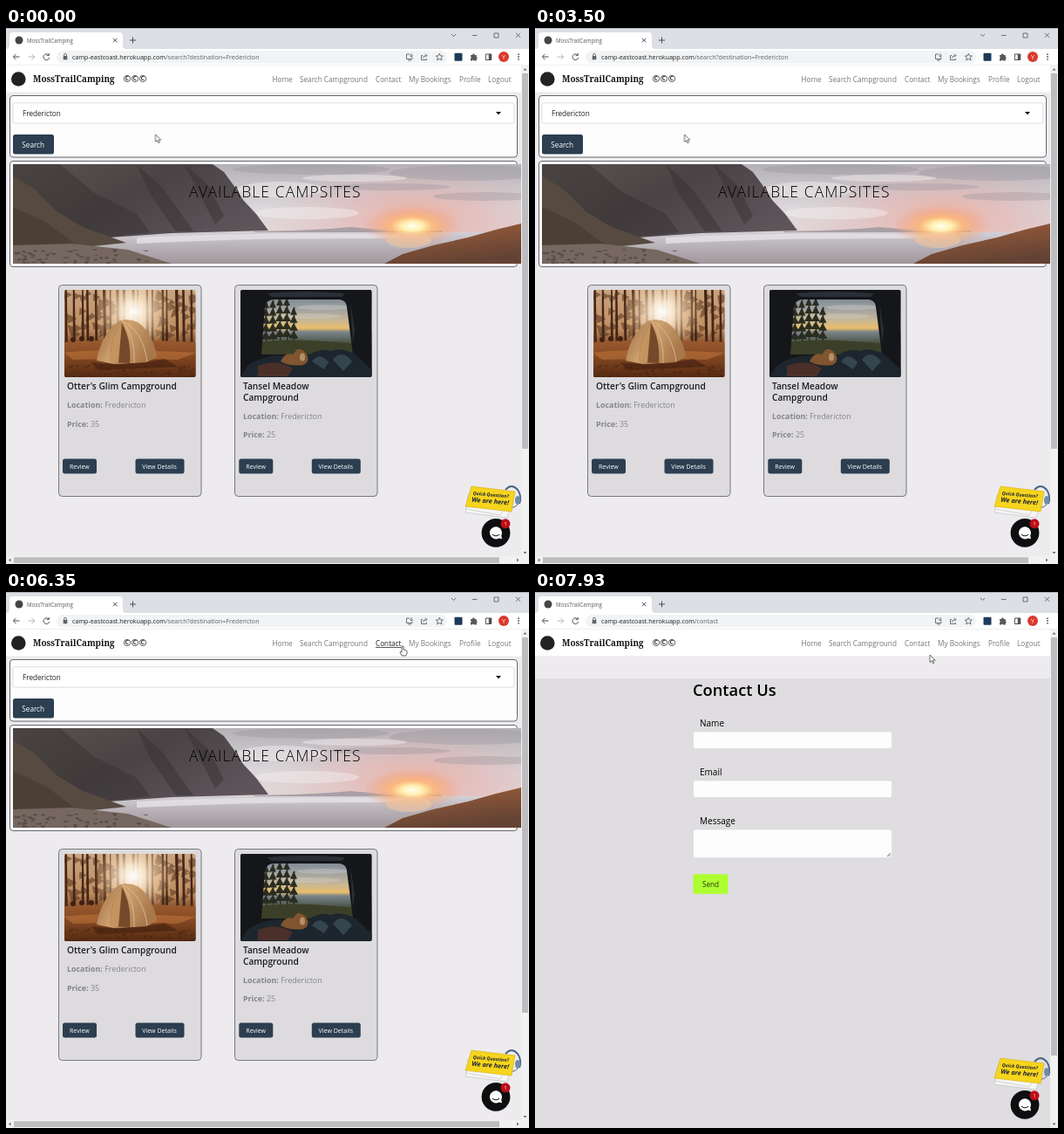
Recreate the animation shown at these times as an HTML page. Size 600 by 614 pixels, loop 8000 ms.

```html
<!DOCTYPE html>
<html lang="en">
<head>
<meta charset="utf-8">
<title>Campsite search</title>
<style>
html, body { margin: 0; width: 100%; height: 100%; overflow: hidden; background: #edebee; }
svg { display: block; width: 100vw; height: 100vh; }
text { font: 8.2px "Open Sans", "Noto Sans", sans-serif; white-space: pre; }
.line { fill: none; stroke: #4b4e53; stroke-width: 1; }
.thin { fill: none; stroke: #5f6368; stroke-width: .9; }
.tab-title { font-size: 6.2px; fill: #55585c; }
.url { font-size: 7.16px; fill: #5f6368; }
.host { fill: #202124; }
.brand { font: 700 9.9px "Noto Serif", serif; fill: #161616; }
.marks { font-size: 10.8px; font-weight: 600; fill: #222; }
.nav text { fill: #777; }
.box { fill: #fdfdfd; stroke: #66686c; stroke-width: 1; }
.button { fill: #2c3e50; }
.on-button { fill: #fff; }
.small { font-size: 7.05px; }
.hero { font-size: 17.5px; font-weight: 300; letter-spacing: 1.1px; }
.card { fill: #dddbde; stroke: #77787b; stroke-width: 1; }
.name { font-size: 10.2px; font-weight: 600; fill: #1c1c1e; }
.info { font-size: 8.9px; fill: #858487; }
.info tspan { font-weight: 700; }
.heading { font-size: 18.3px; font-weight: 600; }
.label { font-size: 10px; }
.track { fill: #f1f1f1; }
.thumb { fill: #bdbdbf; }
.arrow { fill: #6a6a6a; }
.sign { font-weight: 700; font-style: italic; fill: #1d2338; text-anchor: middle; }

/* One shared 8 s timeline with hard cuts */
.before, .after, .loading, .ready, .extension, .search, .contact,
.hover, .pointer, .hand, .widget, .face { animation: 8s step-end infinite; }
.before { animation-name: before; }
.after { animation-name: after; }
.loading { animation-name: loading; }
.ready { animation-name: ready; }
.extension { animation-name: extension; }
.search { animation-name: search; }
.contact { animation-name: contact; }
.hover { animation-name: hover; }
.pointer { animation-name: pointer; }
.hand { animation-name: hand; }
.widget { animation-name: widget; }
.face { animation-name: face; }
@keyframes before { 0% { opacity: 1 } 83%, to { opacity: 0 } }
@keyframes after { 0% { opacity: 0 } 83%, to { opacity: 1 } }
@keyframes loading { 0% { opacity: 0 } 83% { opacity: 1 } 88.375%, to { opacity: 0 } }
@keyframes ready { 0% { opacity: 1 } 83% { opacity: 0 } 88.375%, to { opacity: 1 } }
@keyframes extension { 0% { opacity: 1 } 83% { opacity: .12 } 93.75%, to { opacity: 1 } }
@keyframes search { 0% { opacity: 1 } 86.625%, to { opacity: 0 } }
@keyframes contact { 0% { opacity: 0 } 86.625%, to { opacity: 1 } }
@keyframes hover { 0% { opacity: 0 } 66.875% { opacity: 1 } 86.625%, to { opacity: 0 } }
@keyframes pointer {
  0% { transform: translate(171.5px, 122px); opacity: 1 }
  59.75% { transform: translate(215px, 108px) }
  61.625% { transform: translate(370px, 84px) }
  65.125% { transform: translate(441px, 68px); opacity: 1 }
  66.875% { transform: translate(453px, 72px); opacity: 0 }
  83%, to { transform: translate(453px, 72px); opacity: 1 }
}
@keyframes hand { 0% { opacity: 0 } 66.875% { opacity: 1 } 83%, to { opacity: 0 } }
@keyframes widget {
  0% { transform: none; opacity: 1 }
  86.625% { transform: translateY(9px); opacity: 0 }
  95.5% { transform: translateY(9px); opacity: .5 }
  97.25%, to { transform: translateY(9px); opacity: 1 }
}
@keyframes face { 0% { opacity: 1 } 86.625% { opacity: 0 } 99.125%, to { opacity: 1 } }
</style>
</head>
<body>
<svg viewBox="0 0 600 614" preserveAspectRatio="none">
<defs>
  <linearGradient id="sky" x2="0" y2="1">
    <stop offset="0" stop-color="#b3b0b6"/><stop offset=".25" stop-color="#cbc8cc"/><stop offset=".45" stop-color="#dcd8db"/><stop offset=".68" stop-color="#e3d5d4"/>
  </linearGradient>
  <radialGradient id="blush">
    <stop offset="0" stop-color="#f3a58c" stop-opacity=".75"/><stop offset=".5" stop-color="#e6adab" stop-opacity=".45"/><stop offset="1" stop-color="#d9b5b8" stop-opacity="0"/>
  </radialGradient>
  <radialGradient id="sun">
    <stop offset="0" stop-color="#fffef0"/><stop offset=".22" stop-color="#fff0b0"/>
    <stop offset=".45" stop-color="#fdb877" stop-opacity=".85"/><stop offset="1" stop-color="#f0987c" stop-opacity="0"/>
  </radialGradient>
  <linearGradient id="rock" x2="1" y2=".6">
    <stop offset="0" stop-color="#5c5350"/><stop offset=".5" stop-color="#4a4345"/><stop offset="1" stop-color="#5d555a"/>
  </linearGradient>
  <linearGradient id="sand" x2="0" y2="1">
    <stop offset="0" stop-color="#d3d0d6"/><stop offset=".35" stop-color="#bcb7bd"/><stop offset="1" stop-color="#a0979b"/>
  </linearGradient>
  <linearGradient id="hill" x2=".4" y2="1">
    <stop offset="0" stop-color="#a3603a"/><stop offset="1" stop-color="#644334"/>
  </linearGradient>
  <linearGradient id="forest" x2="0" y2="1">
    <stop offset="0" stop-color="#c9a37f"/><stop offset=".45" stop-color="#c08e62"/><stop offset=".6" stop-color="#8a5530"/><stop offset="1" stop-color="#4f2813"/>
  </linearGradient>
  <linearGradient id="floor" x2="0" y2="1">
    <stop offset="0" stop-color="#9a5a30"/><stop offset=".4" stop-color="#874a24"/><stop offset="1" stop-color="#552a12"/>
  </linearGradient>
  <radialGradient id="flare">
    <stop offset="0" stop-color="#fff"/><stop offset=".25" stop-color="#fff2dc" stop-opacity=".9"/><stop offset="1" stop-color="#ffd09a" stop-opacity="0"/>
  </radialGradient>
  <linearGradient id="tent" y2=".4">
    <stop offset="0" stop-color="#9a683c"/><stop offset=".5" stop-color="#cfa271"/><stop offset="1" stop-color="#a8774b"/>
  </linearGradient>
  <linearGradient id="dusk" x2="0" y2="1">
    <stop offset="0" stop-color="#68747f"/><stop offset=".2" stop-color="#9a9fa3"/><stop offset=".35" stop-color="#c9b795"/><stop offset=".44" stop-color="#e9bd6a"/><stop offset=".48" stop-color="#7c858a"/><stop offset=".56" stop-color="#5c6660"/><stop offset=".64" stop-color="#3d4230"/>
  </linearGradient>
  <linearGradient id="fade"><stop offset="0" stop-color="#fff" stop-opacity="0"/><stop offset="1" stop-color="#fff"/></linearGradient>
  <clipPath id="heroClip"><path d="M8 156H591V270H8Z"/></clipPath>
  <clipPath id="photoClip"><rect width="150.5" height="100" rx="2"/></clipPath>
  <clipPath id="titleClip"><path d="M20 5H117V24H20Z"/></clipPath>
</defs>

<!-- Browser chrome -->
<path fill="#dcdfe3" d="M0 0H600V24H0Z"/>
<path fill="#a5a8ac" d="M0 0H600V.8H0Z"/>
<path fill="#fff" d="M0 24Q4 24 4 20V9Q4 5 8 5H130Q134 5 134 9V20Q134 24 138 24H600V74H0Z"/>
<g class="ready"><circle cx="15" cy="14" r="4.5" fill="#444"/><text class="tab-title" x="24" y="16.5">MossTrailCamping</text></g>
<g class="loading">
  <path class="thin" stroke-width=".6" d="M12 14.5A3 3 0 0 1 14.5 11.5"/>
  <g clip-path="url(#titleClip)"><text class="tab-title" x="24" y="16.5">https://camp-eastcoast.herokuapp</text></g>
  <path fill="url(#fade)" d="M97 6H118V22H97Z"/>
</g>
<path class="line" d="M123 11.8l4.5 4.5m0-4.5l-4.5 4.5M142 14h7m-3.5-3.5v7"/>
<path class="thin" d="M511 7l2.5 2.5L516 7M535 8.5h5.5M560 6h5v5h-5zM585 5.8l5 5m0-5l-5 5"/>
<path class="line" d="M15.5 33h-7m3-3.2L8.3 33l3.2 3.2"/>
<path class="line" stroke-opacity=".4" d="M25.5 33h7m-3-3.2l3.2 3.2-3.2 3.2"/>
<path class="line ready" d="M48.8 30.8A3.4 3.4 0 1 0 49.7 34M49.3 29v2.4h-2.6"/>
<path class="line loading" d="M43.6 30.2l5.4 5.4m0-5.4l-5.4 5.4"/>
<rect x="58" y="26" width="448" height="14.5" rx="7.25" fill="#f1f3f4"/>
<path fill="#5f6368" d="M65.7 32H70.3V36.3H65.7Z"/><path class="thin" d="M66.6 32v-1.3a1.4 1.4 0 0 1 2.8 0V32"/>
<text class="url before" x="76" y="36"><tspan class="host">camp-eastcoast.herokuapp.com</tspan>/search?destination=Fredericton</text>
<text class="url after" x="76" y="36"><tspan class="host">camp-eastcoast.herokuapp.com</tspan>/contact</text>
<path class="thin" d="M463 30h-3.5v5.5h6.5V33.5M461 37h4M465 29v4m-1.7-1.6l1.7 1.7 1.7-1.7M478 31.5h-1.5v5h6v-1.5M478.5 34.5q0-3 4-3m-1.5-2l2 2-2 2"/>
<path class="thin" d="M497.3 29.2l1.2 2.7 2.9.2-2.2 1.9.8 2.9-2.7-1.6-2.6 1.6.7-2.9-2.2-1.9 2.9-.2z"/>
<rect class="extension" x="514.5" y="28.8" width="9" height="9" rx="1" fill="#1c3b58"/>
<path fill="#55595e" d="M533 31h2a1.4 1.4 0 0 1 2.8 0h2v2.2a1.4 1.4 0 0 1 0 2.6V37.5h-2.6a1.3 1.3 0 0 0-2.4 0H533V35a1.4 1.4 0 0 0 0-2.4z"/>
<path class="line" d="M550.3 30h6.5v6.5h-6.5z"/><path fill="#4b4e53" d="M553.8 30h3v6.5h-3z"/>
<circle cx="571" cy="33" r="6" fill="#d83a2c"/><text x="571" y="35.6" class="on-button" text-anchor="middle" style="font-size:7px">Y</text>
<g fill="#4b4e53"><circle cx="588" cy="30.2" r=".9"/><circle cx="588" cy="33" r=".9"/><circle cx="588" cy="35.8" r=".9"/></g>
<path fill="#dedfe2" d="M0 42.5H600V43H0Z"/>

<!-- Site header -->
<circle cx="14.3" cy="58.5" r="8.3" fill="#222"/>
<text class="brand" x="31" y="62">MossTrailCamping</text>
<text class="marks" x="134.5" y="62.3">©©©</text>
<g class="nav">
  <text x="305.5" y="62">Home</text><text x="337" y="62">Search Campground</text><text x="424" y="62">Contact</text>
  <text x="462" y="62">My Bookings</text><text x="520" y="62">Profile</text><text x="553" y="62">Logout</text>
</g>
<g class="hover"><path fill="#fff" d="M423 53H455V66H423Z"/><text x="424" y="62" fill="#222">Contact</text><path fill="#333" d="M424 63H453.5V63.8H424Z"/></g>
<path fill="#edebee" d="M0 73.5H591V614H0Z"/>

<!-- Search results -->
<g class="search">
  <rect class="box" x="4.5" y="77.5" width="582" height="70.5" rx="3.5"/>
  <rect x="8" y="85.8" width="575" height="23.4" rx="2.5" fill="#fff" stroke="#dcdde0"/>
  <text x="19" y="100.8" fill="#222">Fredericton</text>
  <path d="M562 96h6l-3 3.3z"/>
  <rect class="button" x="8" y="122" width="47" height="22.5" rx="2.5"/>
  <text class="on-button" x="18.3" y="136.6">Search</text>
  <rect class="box" x="4.5" y="152.5" width="582" height="121" rx="3.5"/>
  <g clip-path="url(#heroClip)">
    <path fill="url(#sky)" d="M8 156H591V270H8Z"/>
    <ellipse cx="470" cy="215" rx="170" ry="62" fill="url(#blush)"/>
    <g fill="#8d8992" opacity=".28"><ellipse cx="350" cy="162" rx="90" ry="6"/><ellipse cx="530" cy="166" rx="90" ry="9"/><ellipse cx="440" cy="182" rx="70" ry="4"/><ellipse cx="550" cy="193" rx="60" ry="5"/></g>
    <g fill="#f4f0f1" opacity=".45"><ellipse cx="315" cy="185" rx="50" ry="9"/><ellipse cx="400" cy="172" rx="60" ry="4"/><ellipse cx="345" cy="212" rx="60" ry="7"/></g>
    <path fill="#a99fa6" d="M285 233L330 232 372 230 395 228 440 232 500 232V235H285Z"/>
    <path fill="url(#sand)" d="M8 234H591V270H8Z"/>
    <path fill="#e6e3e7" opacity=".8" d="M150 240Q300 233 470 237L430 241Q280 240 150 247Z"/>
    <ellipse cx="466" cy="227" rx="55" ry="24" fill="url(#sun)"/>
    <ellipse cx="462" cy="243" rx="26" ry="9" fill="#f3c9a2" opacity=".55"/>
    <path fill="url(#rock)" d="M8 156H237L250 165 261 180 272 197 287 213 301 232 190 235 90 242 8 250Z"/>
    <path fill="#332f30" opacity=".45" d="M62 156L100 188 150 213 165 234 110 240 60 215 8 178V156ZM150 156L180 184 215 233H195L165 190ZM205 156L232 180 250 215 240 225 222 190Z"/>
    <path fill="#574b41" d="M8 170L32 184 58 210 88 228 138 246 70 253 8 256Z"/>
    <path fill="#45392f" opacity=".6" d="M8 205L45 222 80 248 8 252Z"/>
    <path fill="#766860" d="M8 249L75 247 140 254 190 270H8Z"/>
    <path fill="url(#hill)" d="M591 224L562 231 530 240 490 249 455 259 434 270H591Z"/>
    <g id="stones" fill="#443c3b" opacity=".6"></g>
  </g>
  <text class="hero" x="210" y="194">AVAILABLE CAMPSITES</text>

  <rect class="card" x="60.5" y="294.5" width="163.5" height="242" rx="4"/>
  <g transform="translate(67 300)"><g clip-path="url(#photoClip)">
    <path fill="url(#forest)" d="M0 0H151V100H0Z"/>
    <g id="canopy" fill="#5a3822" opacity=".6"></g>
    <g id="trunks" fill="#452717"></g>
    <circle cx="79" cy="25" r="46" fill="url(#flare)"/>
    <path fill="url(#floor)" d="M0 60Q60 55 151 60V100H0Z"/>
    <path fill="#c67a3c" opacity=".5" d="M0 72Q40 66 151 72L130 80Q70 78 10 80Z"/>
    <g fill="#3f2114"><ellipse cx="10" cy="57" rx="3" ry="3"/><ellipse cx="20" cy="56" rx="3" ry="3"/><ellipse cx="31" cy="56" rx="3" ry="3"/></g>
    <path fill="#3d1d0d" opacity=".55" d="M30 83Q70 88 115 79L130 88 40 92Z"/>
    <path fill="url(#tent)" d="M37 81Q43 48 64 35Q84 31 95 48Q104 61 106 77L94 83 57 85Z"/>
    <path fill="#75492a" d="M53 83Q51 57 66 38Q77 57 75 84Z"/>
    <path fill="#c4935f" d="M53 83Q51 57 66 38L62 83Z"/>
    <path fill="none" stroke="#e6c293" stroke-width=".8" d="M66 35Q90 47 95 82M66 35Q82 55 80 84"/>
    <g id="leaves" fill="#3c1c0d" opacity=".55"></g>
  </g></g>
  <text class="name" x="70" y="414">Otter's Glim Campground</text>
  <text class="info" x="70" y="435"><tspan>Location:</tspan> Fredericton</text>
  <text class="info" x="70" y="456.7"><tspan>Price:</tspan> 35</text>
  <g id="actions">
    <rect class="button" x="65" y="493.5" width="39" height="17" rx="2.5"/><text class="on-button small" x="73" y="505">Review</text>
    <rect class="button" x="148.5" y="493.5" width="56" height="17" rx="2.5"/><text class="on-button small" x="156.3" y="505">View Details</text>
  </g>

  <rect class="card" x="262.5" y="294.5" width="163.5" height="242" rx="4"/>
  <g transform="translate(269 300)"><g clip-path="url(#photoClip)">
    <path fill="url(#dusk)" d="M0 0H151V100H0Z"/>
    <g fill="#d9d6cf" opacity=".35"><ellipse cx="95" cy="20" rx="30" ry="3"/><ellipse cx="80" cy="30" rx="35" ry="3"/></g>
    <g fill="#2b2c20" id="pines"></g>
    <path fill="#3c3f28" d="M20 60Q60 54 132 62V100H20Z"/>
    <path fill="#14161a" fill-rule="evenodd" d="M0 0H151V100H0ZM37 11Q29 12 28 20L24 74H129L122 19Q121 12 114 11Z"/>
    <path fill="#2b2f35" d="M30 4Q75 0 120 4L116 8H36ZM126 14L131 46 129 62Z"/>
    <path fill="#1d262e" d="M8 87Q35 68 72 79Q90 65 103 70Q118 65 133 75L151 92V100H0Z"/>
    <path fill="#35454f" d="M82 82Q91 70 101 83L96 91ZM106 80Q116 67 128 82L118 93Z"/>
    <path fill="#80552f" d="M46 82Q51 71 60 74L65 68Q73 67 77 76Q79 83 72 86Q57 88 46 82Z"/>
    <ellipse cx="71" cy="77" rx="3" ry="4.5" fill="#b3906a"/>
    <path fill="#4b3029" d="M20 87Q43 78 60 90L54 99H20Z"/>
  </g></g>
  <text class="name" x="272" y="414">Tansel Meadow</text><text class="name" x="272" y="426.7">Campground</text>
  <text class="info" x="272" y="447.5"><tspan>Location:</tspan> Fredericton</text>
  <text class="info" x="272" y="469"><tspan>Price:</tspan> 25</text>
  <use href="#actions" x="202.3"/>

  <path class="track" d="M591 43H600V614H0V605H591Z"/>
  <path class="thumb" d="M592 52H599V482H592ZM9 606.3H566V613H9Z"/>
  <path class="arrow" d="M593.5 48.5h4l-2-2.5zM593.5 600h4l-2 2.5zM5.5 607.5v4l-2.5-2zM586 607.5v4l2.5-2z"/>
</g>

<!-- Contact form -->
<g class="contact">
  <path fill="#edebee" d="M0 73.5H591V99H0Z"/><path fill="#dfdde0" d="M0 99H591V614H0Z"/>
  <text class="heading" x="181" y="119">Contact Us</text>
  <text class="label" x="189" y="153.7">Name</text><text class="label" x="189" y="209.7">Email</text><text class="label" x="189" y="265.7">Message</text>
  <g fill="#fdfdfe" stroke="#d2d1d6" stroke-width=".5"><rect x="181.5" y="160" width="228" height="19.5" rx="2.5"/><rect x="181.5" y="216" width="228" height="19.5" rx="2.5"/><rect x="181.5" y="272" width="228" height="32.5" rx="2.5"/></g>
  <path class="thin" stroke-width=".6" d="M404 303l4-4m-1.6 4l1.6-1.6"/>
  <rect x="181.5" y="323.3" width="40" height="22.5" rx="2" fill="#adff2f"/><text x="192" y="337.7" fill="#27331a">Send</text>
  <path class="track" d="M591 43H600V614H591Z"/><path class="thumb" d="M592 52H599V531H592Z"/>
  <path class="arrow" d="M593.5 48.5h4l-2-2.5zM593.5 608.5h4l-2 2.5z"/>
</g>

<!-- Support widget -->
<g class="widget">
  <g fill="#f5f5f4" stroke="#b9bdc0" stroke-width=".6"><path d="M533 530L580 543 575 561 527 555Z"/><path d="M530 535L575 545 567 558 528 551Z"/></g>
  <path fill="none" stroke="#4a6684" stroke-width="2" d="M573 529Q580 521 587 529Q592 536 589 545"/>
  <ellipse cx="587" cy="541" rx="3" ry="5" fill="#6f8dab"/><path fill="none" stroke="#526b82" d="M587 546Q582 551 577 548"/>
  <path fill="#f6d51c" stroke="#d3ac15" stroke-width=".6" d="M534 525L584 531 580 554 527 548Z"/>
  <g transform="rotate(5 556 538)">
    <text class="sign" x="556" y="536.5" style="font-size:5.4px">Quick Question?</text>
    <text class="sign" x="556" y="544.5" style="font-size:7.3px">We are here!</text>
  </g>
  <circle cx="562" cy="578.3" r="16.4" fill="#0d0e10"/>
  <g class="face"><path fill="#fff" d="M562 571.2A7.1 7.1 0 1 0 565.5 584.5L569 585.3 568.2 581.5A7.1 7.1 0 0 0 562 571.2Z"/><path fill="none" stroke="#111" d="M558 580.2Q562 583.5 566 580.2"/></g>
  <circle cx="573" cy="567.8" r="5.5" fill="#bd0d16"/><text x="573" y="570" class="on-button" text-anchor="middle" style="font-size:6px">1</text>
</g>

<!-- Cursors -->
<path class="pointer" fill="#fff" stroke="#4a4a4a" stroke-width=".8" d="M0 0V8.5L2 6.7 3.4 9.8 4.9 9.1 3.5 6.2H6.2Z"/>
<path class="hand" fill="#fff" stroke="#333" stroke-width=".8" d="M454 62.5Q455 61 456 62.5V66L458.8 66.6 460 68V70.5L458.5 73H454.5L452 69.3Q452 67.8 454 69Z"/>
</svg>
<script>
// Seeded texture for the landscape and the two woods
let seed = 17;
const random = () => (seed = seed * 16807 % 2147483647) / 2147483647;
const scatter = (id, count, shape) => {
  const path = document.createElementNS('http://www.w3.org/2000/svg', 'path');
  path.setAttribute('d', Array.from({ length: count }, (_, i) => shape(i)).join(''));
  document.getElementById(id).append(path);
};
scatter('stones', 60, () => `M${8 + random() * 150} ${253 + random() * 16}h${2 + random() * 5}l-1 ${1 + random() * 2}h-3z`);
scatter('canopy', 80, i => `M${(i % 2 ? 0 : 95) + random() * 55} ${random() * 48}l${5 + random() * 7} 4l-9 5z`);
scatter('trunks', 19, i => `M${i * 8.3 + random() * 4} 0h${1 + random() * 2.5}l1 ${56 + random() * 9}h-3z`);
scatter('leaves', 70, () => `M${random() * 150} ${86 + random() * 14}l${2 + random() * 4} -1l-2 2z`);
scatter('pines', 5, i => {
  const x = 29 + i * 8, top = 8 + random() * 13;
  return `M${x} ${top}h1.4V70h-1.4z` + [0, 1, 2, 3, 4].map(k => `M${x} ${top + k * 9}l${4 + k * .5} 9h-${8 + k}z`).join('');
});
</script>
</body>
</html>
```
